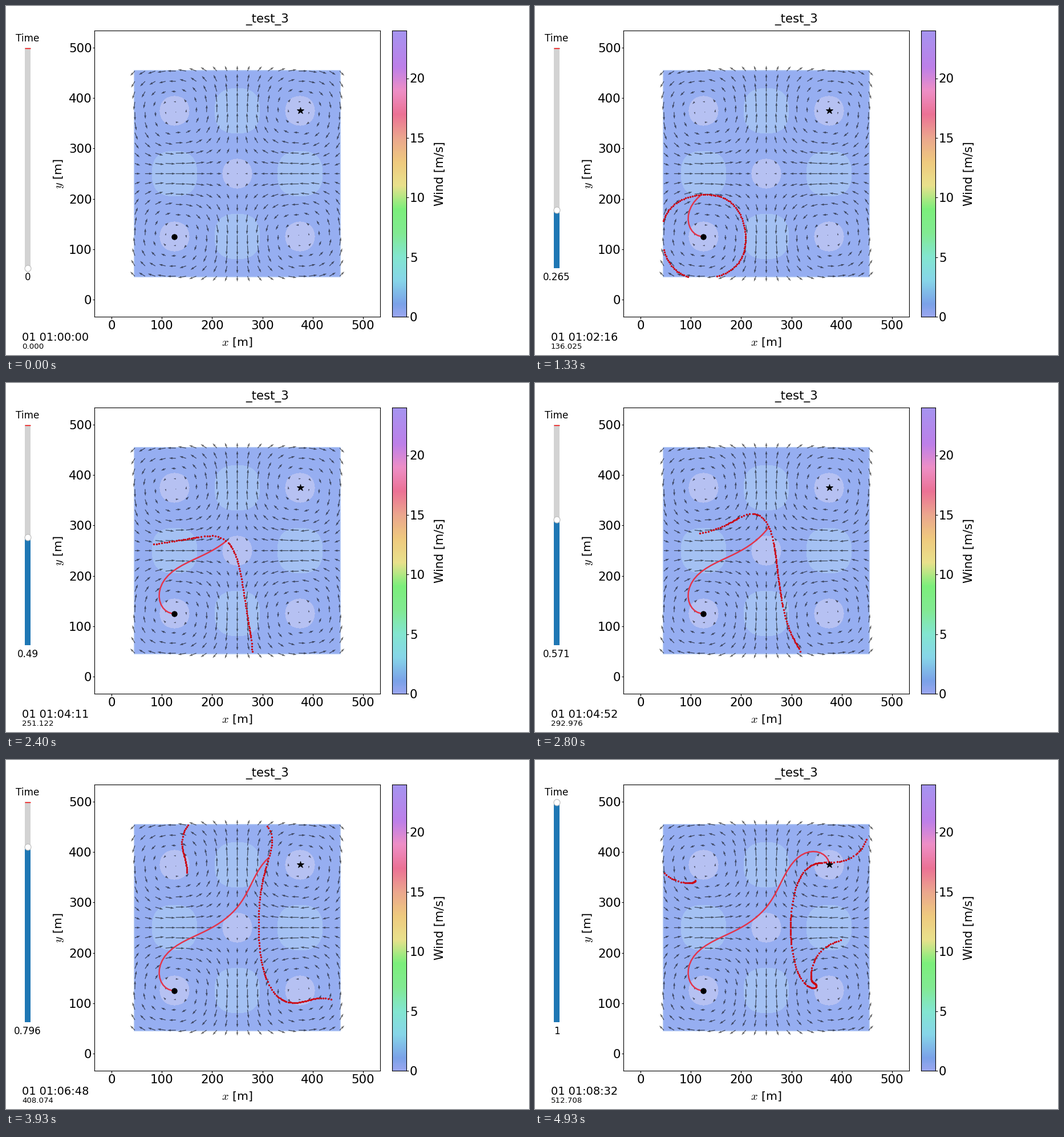
Recreate the animation shown at these times as a matplotlib script. Size 917 by 611 pixels, loop 5.06 s.

```python
import numpy as np
import matplotlib.pyplot as plt
from matplotlib.animation import FuncAnimation
from matplotlib.colors import LinearSegmentedColormap
from matplotlib.patches import Rectangle

plt.rcParams["font.family"] = "DejaVu Sans"
plt.rcParams["mathtext.fontset"] = "cm"

W, H, DPI = 917, 611, 100
STATES, TICK_MS, LOOP_MS = 50, 20, 5060
DURATION = 512.708
DT = DURATION / (STATES - 1)
K = 2 * np.pi / 500            # wave number of the gyres
AIRSPEED = 0.6
LOW, HIGH = 45, 455            # bounds of the wind domain
MAX_GAP = 7                    # front is refined beyond this spacing
START, TARGET = np.array([125, 125]), np.array([375, 375])


def pt(pixels):
    return pixels * 72 / DPI


def wind(x, y):
    return -np.sin(K * x) * np.cos(K * y), np.cos(K * x) * np.sin(K * y)


def step(s):
    """Euler step of time-optimal steering: heading follows the costate."""
    x, y, px, py = s
    u, v = wind(x, y)
    norm = np.hypot(px, py)
    cc = K * np.cos(K * x) * np.cos(K * y)
    ss = K * np.sin(K * x) * np.sin(K * y)
    return s + DT * np.array([u + AIRSPEED * px / norm, v + AIRSPEED * py / norm,
                              cc * px + ss * py, -ss * px - cc * py])


def launch(angles):
    one = np.ones_like(angles)
    return np.array([START[0] * one, START[1] * one, np.cos(angles), np.sin(angles)])


def shoot(angles):
    s = launch(angles)
    track = [s[:2]]
    for _ in range(STATES - 1):
        s = step(s)
        track.append(s[:2])
    return np.array(track)


def best_path():
    mid, half = np.radians(183), np.radians(32)
    for _ in range(4):
        angles = np.linspace(mid - half, mid + half, 601)
        track = shoot(angles)
        best = np.argmin(np.hypot(*(track[-1] - TARGET[:, None])))
        mid, half = angles[best], half / 75
    return track[:, :, best]


def refine(s, alive):
    after = np.roll(s, -1, axis=1)
    split = alive & np.roll(alive, -1) & (np.hypot(*(after - s)[:2]) > MAX_GAP)
    where = np.flatnonzero(split) + 1
    middle = (s + after)[:, split] / 2
    return np.insert(s, where, middle, axis=1), np.insert(alive, where, True)


def reach_fronts():
    s = launch(np.arange(64) * 2 * np.pi / 64)
    alive = np.ones(64, bool)
    fronts = [s[:2].copy()]
    for _ in range(STATES - 1):
        s[:, alive] = step(s[:, alive])
        alive &= ((s[:2] > LOW) & (s[:2] < HIGH)).all(axis=0)
        s, alive = refine(s, alive)
        fronts.append(s[:2, alive])
    return fronts


path = best_path()
fronts = reach_fronts()

fig = plt.figure(figsize=(W / DPI, H / DPI), dpi=DPI, facecolor="white")


def pixel_axes(left, top, width, height):
    axes = fig.add_axes([left / W, 1 - (top + height) / H, width / W, height / H])
    for spine in axes.spines.values():
        spine.set_linewidth(0.8)
    return axes


# Wind map
ax = pixel_axes(155, 43, 501, 501)
ax.set_xlim(250 - 284.6, 250 + 284.6)
ax.set_ylim(250 - 284.6, 250 + 284.6)
ax.set_xticks(range(0, 501, 100))
ax.set_yticks(range(0, 501, 100))
ax.tick_params(labelsize=pt(21.4), length=pt(3.5), width=0.8)
ax.tick_params(axis="x", pad=pt(2))
ax.tick_params(axis="y", pad=pt(1))

fine = np.linspace(LOW, HIGH, 240)
gx, gy = np.meshgrid(fine, fine)
ax.contourf(gx, gy, np.hypot(*wind(gx, gy)), levels=[-1, 0.37, 0.846, 2],
            colors=["#b6c1f2", "#96aef1", "#a4c1f3"], zorder=0)
ax.add_patch(Rectangle((LOW, LOW), HIGH - LOW, HIGH - LOW, fill=False,
                       edgecolor="#a6bff3", linewidth=pt(1.6), zorder=0.5))
coarse = np.linspace(LOW + 1, HIGH - 1, 21)
qx, qy = np.meshgrid(coarse, coarse)
ax.quiver(qx, qy, *wind(qx, qy), scale=501 / 17.7, width=0.0025,
          color="black", alpha=0.6, zorder=1)

route, = ax.plot([], [], color="#e3344a", lw=pt(2.5), zorder=3)
dots, = ax.plot([], [], "o", color="#cb0612", ms=pt(3.4), mew=0, zorder=4)
ax.plot(*START, "o", color="black", ms=pt(10.4), mew=0, zorder=5)
ax.plot(*TARGET, "*", color="black", ms=pt(12), mew=pt(1), zorder=5)

# Colour bar
stops = [(0, "#98a6f0"), (1, "#7ba2e8"), (3, "#87d6e9"), (5, "#83e6d0"),
         (7, "#82ea92"), (9, "#7cef7c"), (11, "#e9e18c"),
         (13, "#efca7f"), (15, "#eba78e"), (17, "#eb7295"), (19, "#ee8fc6"),
         (21, "#bd80e9"), (24, "#a694f0")]
wind_map = LinearSegmentedColormap.from_list("wind", [(v / 24, c) for v, c in stops])
bar = pixel_axes(676.8, 43, 501 / 20, 501)
bar.imshow(np.linspace(0, 1, 256)[:, None], cmap=wind_map, origin="lower",
           extent=[0, 1, 0, 24], aspect="auto")
bar.set_xticks([])
bar.set_yticks(range(0, 21, 5))
bar.yaxis.tick_right()
bar.tick_params(labelsize=pt(21.4), length=pt(3.5), width=0.8, pad=pt(2.5))

# Overlay in pixel coordinates for labels and the slider
stage = pixel_axes(0, 0, W, H)
stage.set_xlim(0, W)
stage.set_ylim(H, 0)
stage.axis("off")


def label(x, y, text, size, ha="center", va="baseline", rotation=0):
    return stage.text(x, y, text, fontsize=pt(size), ha=ha, va=va, rotation=rotation)


label(458.5, 28.5, "_test_3", 21.4)
label(405, 594.5, "$x$ [m]", 20.5)
label(92, 293.5, "$y$ [m]", 20.5, va="center", rotation=90)
label(760.5, 294, "Wind [m/s]", 20.8, va="center", rotation=90)
label(38, 62, "Time", 16.9)
value = label(38, 479.5, "", 16.8)
clock = label(28, 586, "", 19.4, ha="left")
seconds = label(28, 600, "", 13.4, ha="left")

TOP, BOTTOM = 73, 458.5
stage.add_patch(Rectangle((33, TOP), 10, BOTTOM - TOP, color="lightgrey", lw=0))
fill = stage.add_patch(Rectangle((33, BOTTOM), 10, 0, color="#1f77b4", lw=0))
stage.plot([33, 43], [TOP + 0.5] * 2, color="red", lw=pt(1.4), solid_capstyle="butt")
knob, = stage.plot([], [], "o", ms=pt(11), mfc="white", mec="0.75", mew=pt(1.2))


def short(v):
    """Fewest decimals that stay within a thousandth."""
    digits = next(n for n in range(4) if abs(v - round(v, n)) < 1e-3)
    return f"{v:.{digits}f}"


def draw(frame):
    ms = frame * TICK_MS + TICK_MS // 2
    # states last 130 and 70 ms in turn
    i = min(2 * (ms // 200) + (ms % 200 >= 130), STATES - 1)
    share = i / (STATES - 1)
    elapsed = share * DURATION
    route.set_data(*path[:i + 1].T)
    dots.set_data(*fronts[i])
    y = BOTTOM - share * (BOTTOM - TOP)
    fill.set_y(y)
    fill.set_height(BOTTOM - y)
    knob.set_data([38.2], [y + 0.5])
    value.set_text(short(share))
    minutes, secs = divmod(int(elapsed), 60)
    clock.set_text(f"01 01:{minutes:02d}:{secs:02d}")
    seconds.set_text(f"{elapsed:.3f}")
    return route, dots, fill, knob, value, clock, seconds


anim = FuncAnimation(fig, draw, frames=LOOP_MS // TICK_MS, interval=TICK_MS,
                     repeat=True, repeat_delay=0)
plt.show()
```
